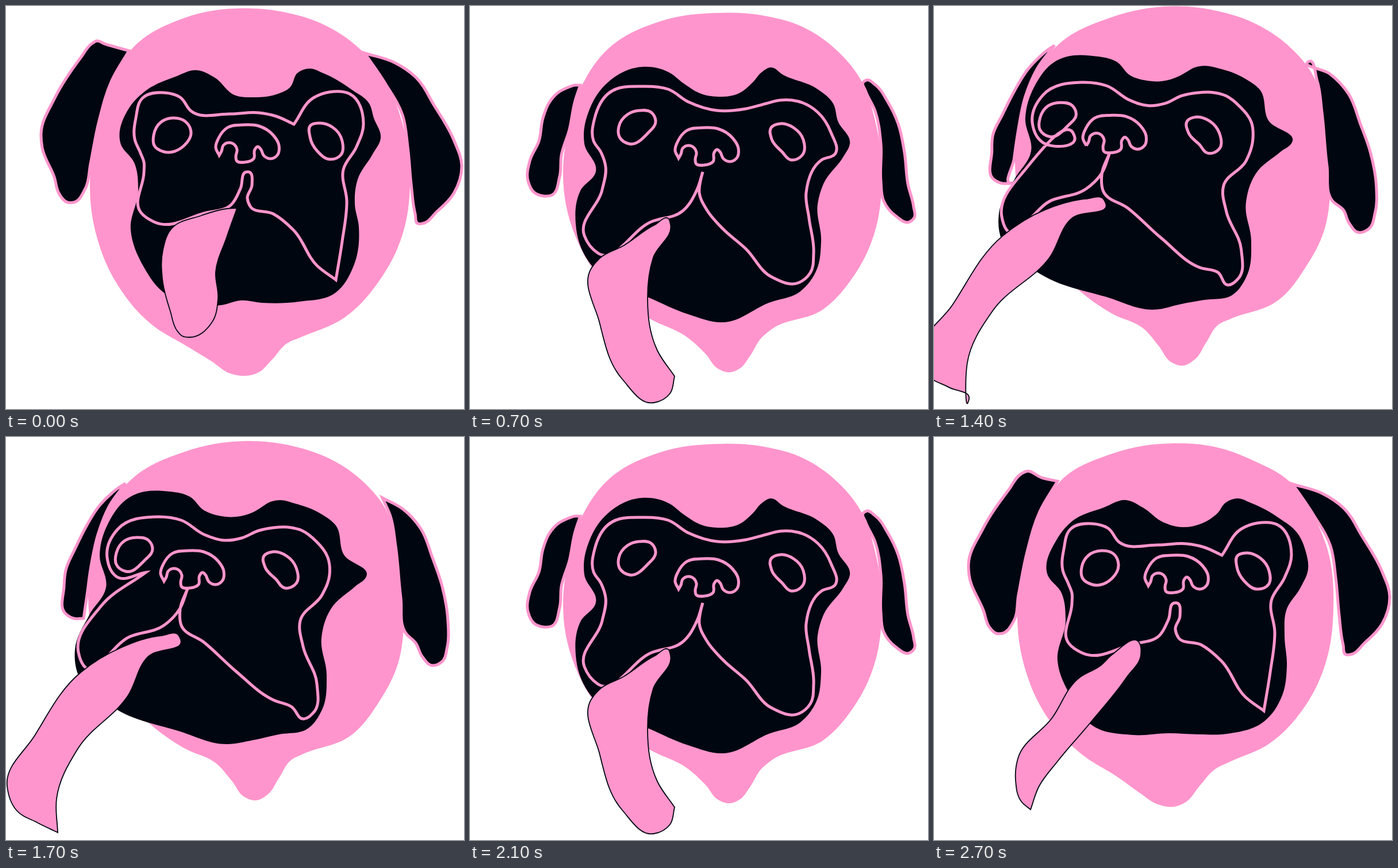
An HTML page for the animation above (2800 ms loop, 797 by 702 pixels).

```html
<!DOCTYPE html>
<html lang="en">
<head>
<meta charset="utf-8">
<title>Pug</title>
<style>
html, body { margin: 0; width: 100%; height: 100%; overflow: hidden; background: #fff; }
svg { display: block; width: 797px; height: 702px; }
.pink { fill: #ff95cc; }
.dark { fill: #000610; }
.ear { fill: #000610; stroke: #ff95cc; stroke-width: 5; }
.line { fill: none; stroke: #ff95cc; stroke-width: 5; }
.tongue { fill: #ff95cc; stroke: #000610; stroke-width: 1.8; }
</style>
</head>
<body>
<svg viewBox="0 0 797 702"><g id="dog"></g></svg>
<script>
const STEP = 100, STEPS = 28;
const KEYS = [0, 1, 3, 7, 11];

const pts = s => s.trim().split(/\s+/).map(p => p.split(',').map(Number));
const move = (shape, dx, dy) => shape.map(([x, y]) => [x + dx, y + dy]);
const mix = (a, b, k) => a.map(([x, y], i) => [x + (b[i][0] - x) * k, y + (b[i][1] - y) * k]);

// Repeated points make sharp corners.
const head = [
  '418,4 490,12 560,36 618,77 662,135 690,205 703,310 690,398 650,478 590,542 513,577 490,587 462,617 438,639 418,644 390,640 358,619 312,591 255,556 195,487 158,402 146,315 160,213 187,128 218,76 310,21',
  '418,11 488,17 560,43 618,77 657,132 683,190 695,300 682,392 645,470 585,533 512,567 490,578 462,608 438,636 418,644 390,640 358,620 322,594 255,551 195,485 158,402 145,300 160,205 187,128 218,79 310,29',
  '427,6 500,14 570,38 620,69 655,104 688,185 703,300 692,382 655,458 600,521 520,562 500,574 475,603 448,633 427,639 400,634 368,613 330,588 265,544 205,478 165,388 153,295 160,220 182,152 216,84 310,31',
  '437,12 512,17 582,38 640,79 682,132 705,200 716,325 703,398 668,470 615,528 525,563 508,577 487,610 470,631 452,638 432,632 410,606 378,577 310,543 240,490 183,400 162,285 168,230 195,138 240,75 330,27',
  '418,7 500,16 575,44 628,84 662,128 682,200 692,335 682,395 650,460 600,520 515,553 497,562 475,594 455,623 435,633 415,627 393,599 365,568 310,542 243,493 165,390 143,280 150,210 175,130 218,74 310,26'
].map(pts);

const earL = [
  '157,61 172,66 214,78 214,78 184,130 162,200 147,275 138,318 118,342 107,342 93,328 84,298 63,247 61,222 85,160 130,90 150,65',
  '160,60 188,71 215,77 215,77 184,130 162,200 147,275 138,322 119,342 108,342 97,332 86,302 61,240 60,222 85,160 130,92 152,64',
  '160,68 188,80 214,86 214,86 185,140 162,215 146,290 137,330 131,342 124,345 108,335 103,298 78,250 77,230 97,165 132,102 151,73',
  '170,142 182,138 192,138 192,138 183,165 173,215 159,260 156,297 141,330 128,331 112,325 101,305 104,270 120,235 127,195 138,168 153,151',
  '185,97 195,89 208,81 208,81 180,120 160,170 148,225 141,275 135,316 135,316 118,316 104,308 101,260 104,232 120,195 140,155 163,119'
].map(pts);

const earR = [
  '624,82 624,82 675,98 713,124 745,173 780,235 793,278 780,325 750,358 724,379 717,379 712,362 705,310 699,245 690,190 660,135',
  '657,108 657,108 695,138 742,182 765,225 778,265 777,295 765,328 748,355 732,363 712,352 706,335 706,290 705,250 697,200 675,145',
  '684,133 690,129 705,137 727,167 745,205 756,255 762,310 772,350 773,369 765,376 740,365 720,340 715,305 715,240 705,183 688,147',
  '655,106 655,106 690,125 722,160 742,210 759,260 769,320 768,365 758,392 742,398 724,382 713,359 696,342 687,280 678,190 669,138'
].map(pts);
earR.unshift(earR[0]);

const face = [
  '333,112 362,124 400,156 430,159 470,154 494,142 508,116 528,109 552,117 602,146 632,170 640,195 652,230 638,258 612,302 607,345 614,385 604,455 574,499 510,515 445,517 408,513 375,521 273,498 240,455 217,390 230,320 224,275 199,238 214,178 240,150 295,123',
  '335,110 362,122 400,149 432,157 465,151 493,133 508,114 527,107 552,115 600,141 632,167 647,200 651,230 638,262 613,302 610,345 614,400 606,450 575,495 510,517 460,518 410,516 345,519 275,502 240,455 215,390 229,318 222,272 197,238 214,178 240,147 295,123',
  '345,112 372,126 400,151 425,157 470,152 490,140 506,115 528,107 550,114 605,144 635,170 644,200 654,230 640,260 613,305 609,345 616,390 606,460 575,500 525,514 455,551 412,549 370,530 300,500 225,432 206,375 229,310 222,272 197,235 212,165 240,130 298,105',
  '345,115 372,135 400,152 432,158 468,152 492,133 508,115 523,107 545,120 605,145 632,170 640,200 661,240 650,262 615,310 605,345 611,410 603,460 575,497 520,517 440,551 380,537 309,507 240,478 205,443 184,380 192,322 219,288 199,240 208,180 240,133 300,106',
  '320,104 345,128 370,137 400,139 430,131 445,122 460,113 478,110 500,115 550,135 573,153 588,205 627,243 608,260 565,300 549,350 558,415 550,475 525,508 475,518 430,528 385,535 300,512 190,473 127,418 120,370 145,310 174,262 163,205 178,150 215,105 285,95'
].map(pts);

const mask = [
  '275,151 303,159 322,183 390,188 440,186 470,192 501,206 501,206 535,160 562,150 598,153 622,205 610,245 587,285 593,340 585,410 574,477 574,477 542,453 500,390 465,362 425,349 420,335 428,312 422,289 419,289 408,318 392,346 345,361 260,377 235,360 240,290 240,272 234,256 224,232 226,195 238,160',
  '280,150 305,160 345,185 390,188 440,185 468,191 484,196 499,190 530,158 560,148 592,158 623,213 610,245 580,295 586,345 602,410 597,434 577,443 545,435 505,398 465,376 425,356 408,332 401,315 403,297 403,297 385,320 355,347 315,365 264,388 233,360 246,290 243,268 239,250 231,220 233,190 250,160',
  '305,140 345,145 380,167 430,182 480,179 515,170 540,164 560,164 580,169 605,185 628,220 635,258 612,268 585,325 590,370 598,430 592,465 572,482 525,472 480,423 440,388 412,355 399,325 401,305 405,289 405,289 395,320 370,357 315,376 222,430 199,400 230,320 236,280 228,255 215,235 217,195 240,153',
  '265,139 305,145 345,170 380,180 410,176 440,163 465,158 490,157 515,163 540,182 560,210 563,240 550,275 512,320 517,365 541,430 535,480 518,491 497,470 465,458 400,408 345,358 305,328 303,300 316,264 316,264 302,300 275,328 215,348 135,398 126,375 165,295 243,236 243,236 192,243 176,210 195,160'
].map(pts);
mask.unshift(mask[0]);

const eyeL = [
  '291,195 313,202 322,222 310,243 275,254 258,243 257,225 270,202',
  '291,198 313,204 321,222 310,246 275,257 258,245 257,227 269,206',
  '293,185 316,194 323,215 308,237 275,244 260,233 260,215 273,193',
  '295,182 315,185 323,200 309,222 277,240 260,228 259,210 274,189',
  '227,175 248,180 255,195 241,215 208,234 192,222 192,202 206,181'
].map(pts);

const eyeR = [
  '545,204 568,211 585,235 583,259 564,267 542,253 529,228 530,208',
  '543,202 568,211 583,233 582,257 562,265 540,251 527,226 528,207',
  '544,194 568,202 584,223 583,247 566,256 544,245 530,220 530,199',
  '540,205 563,212 580,233 578,260 558,268 543,254 525,232 524,212',
  '464,200 488,207 505,228 505,255 485,263 470,248 451,227 449,207'
].map(pts);

const snout = pts('371,260 371,260 365,247 370,230 385,212 413,207 440,209 465,225 475,243 472,260 460,266 449,261 443,249 438,245 433,250 431,266 416,272 401,269 400,262 402,250 398,242 388,238 378,243 375,253');
const nose = [[0, 0], [2, -1], [-12, 8], [-8, 5], [-96, -9]].map(([x, y]) => move(snout, x, y));

const tongue = [
  '402,352 402,352 384,403 365,463 369,510 359,550 320,577 307,575 298,566 286,532 272,475 273,425 287,389 340,365 385,353',
  '357,358 360,379 335,419 271,499 215,565 182,610 168,649 168,649 152,635 142,598 146,560 205,490 252,420 290,398 310,379',
  '421,378 421,378 375,410 347,475 362,527 357,542 300,546 265,542 234,534 223,490 224,440 235,404 260,394 320,389 370,371',
  '346,371 349,381 319,438 309,510 326,600 356,645 356,645 348,675 320,691 265,650 225,550 211,457 225,440 268,417 320,382',
  '300,345 304,353 248,382 212,451 125,543 88,630 90,689 90,689 55,672 18,650 2,608 50,520 130,410 200,367 270,346'
].map(pts);
tongue.splice(2, 0, move(tongue[3], 18, 10));

// Closed smooth curve; the nearer neighbour weighs more in each tangent.
function curve(p) {
  const n = p.length;
  const seg = p.map((a, i) => {
    const b = p[(i + 1) % n], dx = b[0] - a[0], dy = b[1] - a[1], len = Math.hypot(dx, dy);
    return { len, x: len ? dx / len : 0, y: len ? dy / len : 0 };
  });
  const tan = p.map((_, i) => {
    const a = seg[(i + n - 1) % n], b = seg[i];
    const wa = a.len ? b.len || 1 : 0, wb = b.len ? a.len || 1 : 0;
    const x = a.x * wa + b.x * wb, y = a.y * wa + b.y * wb, l = Math.hypot(x, y) || 1;
    return [x / l, y / l];
  });
  let d = 'M' + p[0];
  p.forEach((a, i) => {
    const j = (i + 1) % n, b = p[j], k = seg[i].len * 0.35;
    const c = [a[0] + tan[i][0] * k, a[1] + tan[i][1] * k, b[0] - tan[j][0] * k, b[1] - tan[j][1] * k, b[0], b[1]];
    d += 'C' + c.map(v => v.toFixed(1));
  });
  return d + 'Z';
}

function pose(keys, poses, at) {
  let i = 0;
  while (i < keys.length - 2 && at > keys[i + 1]) i++;
  let k = (at - keys[i]) / (keys[i + 1] - keys[i]);
  if (k > 1) k = 1 + (k - 1) * 0.15;
  return mix(poses[i], poses[i + 1], k);
}

const dog = document.getElementById('dog');
const layers = [
  ['pink', head], ['ear', earL], ['ear', earR], ['dark', face], ['line', mask],
  ['line', eyeL], ['line', eyeR], ['line', nose], ['tongue', tongue, [0, 1, 2, 3, 7, 11]]
].map(([cls, poses, keys = KEYS]) => {
  const el = document.createElementNS('http://www.w3.org/2000/svg', 'path');
  el.setAttribute('class', cls);
  dog.append(el);
  return { el, poses, keys };
});

let shown = -1;
function draw() {
  const step = Math.floor(performance.now() / STEP) % STEPS;
  if (step !== shown) {
    shown = step;
    const at = Math.min(step, STEPS - step);
    for (const { el, poses, keys } of layers) el.setAttribute('d', curve(pose(keys, poses, at)));
    dog.setAttribute('transform', `translate(0 ${at > 11 ? -6 : 0})`);
  }
  requestAnimationFrame(draw);
}
draw();
</script>
</body>
</html>
```
